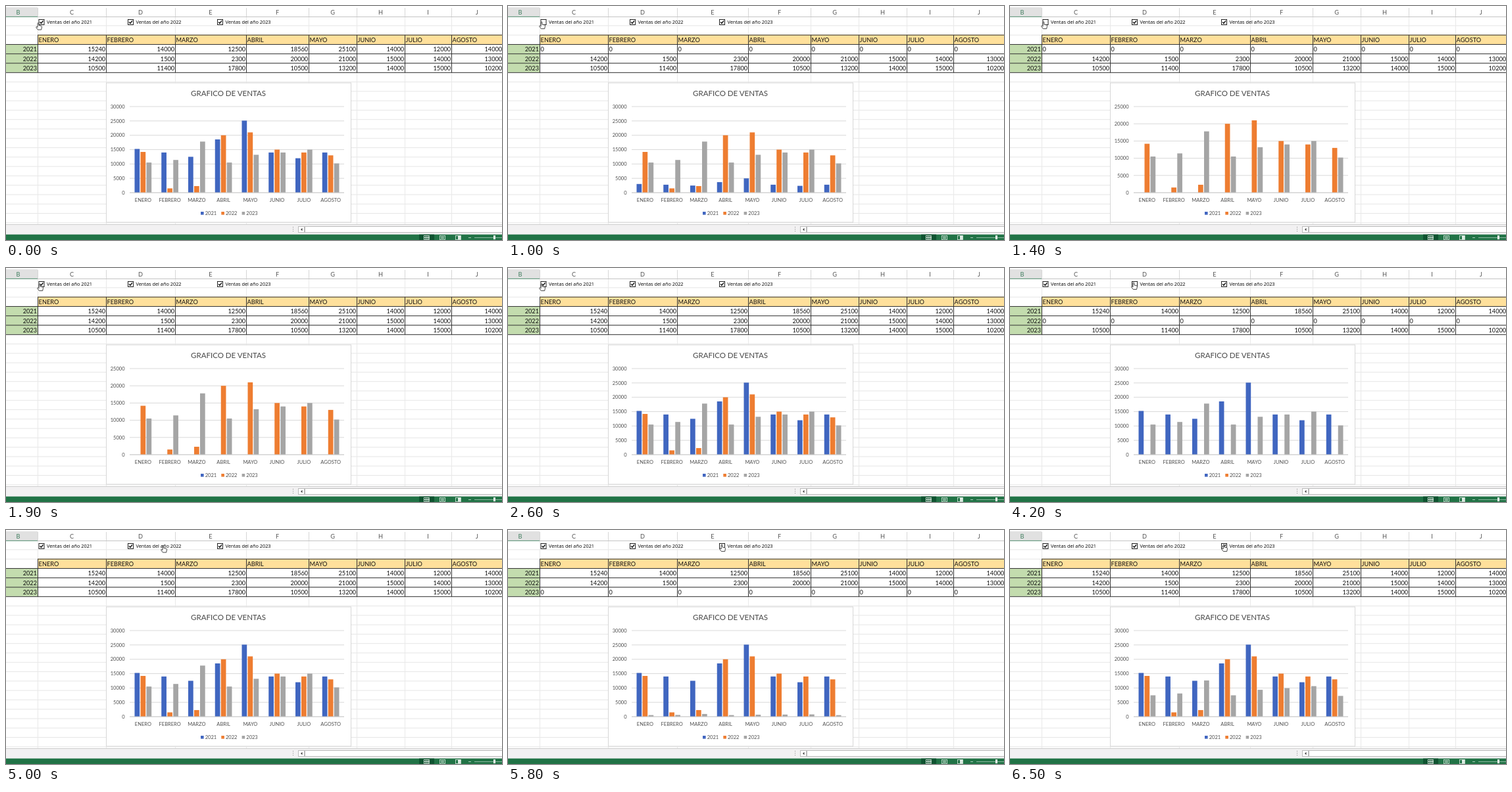
An HTML page that plays this animation: 754x356 px, repeating every 6.6 s.

```html
<!DOCTYPE html>
<html lang="es">
<head>
<meta charset="utf-8">
<title>Grafico de ventas</title>
<style>
  html, body { margin: 0; width: 100%; height: 100%; overflow: hidden; background: #fff; }
  svg { display: block; width: 754px; height: 356px; }
  text { font-family: Lato, Carlito, sans-serif; font-size: 9.2px; fill: #111; white-space: pre; }
  .head { fill: #555; }
  .small { font-size: 7.5px; fill: #505050; }
  .title { font-size: 11.5px; fill: #484848; }
  .check { font-family: "Open Sans", sans-serif; font-size: 7.35px; fill: #000; }
  .line { shape-rendering: crispEdges; }
</style>
</head>
<body>
<svg id="stage" viewBox="0 0 754 356"></svg>
<script>
const stage = document.getElementById("stage");
const LOOP = 6600, STEP = 100, EASE_MS = 480;

const months = ["ENERO", "FEBRERO", "MARZO", "ABRIL", "MAYO", "JUNIO", "JULIO", "AGOSTO"];
const cols = [48, 152, 257, 365, 460, 533, 606, 677, 755];
const series = [
  { year: 2021, color: "#4066c0", box: 54, off: 800, on: 1900,
    sales: [15240, 14000, 12500, 18560, 25100, 14000, 12000, 14000] },
  { year: 2022, color: "#ee7d31", box: 189.5, off: 3400, on: 4300,
    sales: [14200, 1500, 2300, 20000, 21000, 15000, 14000, 13000] },
  { year: 2023, color: "#a5a5a5", box: 325.5, off: 5500, on: 6338,
    sales: [10500, 11400, 17800, 10500, 13200, 14000, 15000, 10200] }
];
// Pointer stops: time, x, y of the fingertip
const path = [
  [0, 49, 25.5], [300, 51, 24], [2700, 51, 24], [3200, 187, 21.5],
  [4500, 188, 22], [5000, 239, 23.5], [5400, 325, 22], [LOOP, 325, 22]
];

function add(tag, attrs, parent = stage) {
  const el = document.createElementNS("http://www.w3.org/2000/svg", tag);
  for (const k in attrs) el.setAttribute(k, attrs[k]);
  parent.appendChild(el);
  return el;
}
const rect = (x, y, width, height, fill, more) =>
  add("rect", { x, y, width, height, fill, ...more });
const line = (x, y, w, h, fill) => rect(x, y, w, h, fill, { class: "line" });
function text(str, x, y, cls = "", anchor = "start") {
  const el = add("text", { x, y, class: cls, "text-anchor": anchor });
  el.textContent = str;
  return el;
}
const rowY = k => 43.7 + 14.28 * k;

// Sheet grid and column headings
function drawSheet() {
  rect(0, 0, 754, 356, "#fff");
  for (let k = -1; k <= 20; k++) rect(0, rowY(k), 754, 1, "#e6e6e6");
  for (const x of cols) line(x, 17, 1, 315, "#e9e9e9");
  line(0, 2, 48, 14, "#e1e1e1");
  rect(0, 16, 754, 1, "#c4c4c4");
  rect(0, 15.8, 48, 1, "#5a9678");
  for (const x of cols) line(x, 3, 1, 13, "#d6d6d6");
  text("B", 18.5, 13, "head", "middle").style.fill = "#3f7d5e";
  months.forEach((_, i) => {
    const mid = i === 7 ? 716 : (cols[i] + cols[i + 1]) / 2;
    text("CDEFGHIJ"[i], mid, 13, "head", "middle");
  });
}

function drawTable() {
  rect(48, rowY(0), 706, 14.28, "#ffe09b");
  rect(0, rowY(1), 48, 42.84, "#c3dcae");
  rect(48, rowY(0), 706, 1, "#333");
  for (let k = 1; k <= 4; k++) rect(0, rowY(k), 754, 1, "#333");
  for (const x of cols) line(x, 44, 1, 57, "#333");
  months.forEach((m, i) => text(m, cols[i] + 1.6, 55));
  series.forEach((s, r) => {
    const y = rowY(r + 1) + 11.3;
    text(s.year, 47, y, "", "end");
    s.cells = s.sales.map((v, i) => text(v, cols[i + 1] - 0.8, y, "", "end"));
  });
}

function drawChecks() {
  for (const s of series) {
    rect(s.box - 4, 20.5, 8, 8, "#fff", { stroke: "#222", "stroke-width": 1 });
    s.tick = add("path", {
      d: `M${s.box - 2.4} 24.4l1.8 2l3.1-4`, fill: "none", stroke: "#111", "stroke-width": 1.5
    });
    text("Ventas del año " + s.year, s.box + 8, 27.2, "check");
  }
}

const BASE = 284, PLOT_H = 131, SLOT = 40.75, BAR = 7.7, PITCH = 9;
const axis = [];

function drawChart() {
  rect(152.5, 117, 372, 212, "#fff", { stroke: "#d6d6d6" });
  text("GRAFICO DE VENTAS", 338, 137.3, "title", "middle");
  for (let k = 0; k <= 6; k++) {
    axis.push({
      rule: rect(188, BASE, 326, 1, "#d9d9d9"),
      label: text(k * 5000, 180.5, 0, "small", "end")
    });
  }
  series.forEach((s, r) => {
    s.bars = months.map((_, i) =>
      rect(195.5 + SLOT * i + r * PITCH, BASE, BAR, 0, s.color));
    const x = 296 + r * 31.3;
    rect(x, 313, 4.6, 4.6, s.color);
    text(s.year, x + 6.7, 318, "small");
  });
  rect(188, BASE - 0.5, 326, 1, "#cfcfcf");
  months.forEach((m, i) => text(m, 188 + SLOT * (i + 0.5), 298, "small", "middle"));
}

// Scroll bar and status bar
function drawFooter() {
  rect(0, 332, 754, 16, "#f2f1f2");
  line(0, 332, 754, 1, "#cdcdcd");
  for (let k = 0; k < 3; k++) line(436, 336 + k * 3, 1, 1, "#888");
  rect(444.5, 335.5, 9, 9, "#fff", { stroke: "#bbb" });
  add("path", { d: "M450.5 337.8v4.4l-2.6-2.2z", fill: "#444" });
  rect(454.5, 335.5, 310, 9, "#fff", { stroke: "#bbb" });
  rect(0, 347.6, 754, 9, "#217346");
  rect(628, 347.6, 23, 9, "#0f5330");
  for (const x of [635, 659, 683]) {
    rect(x + 0.5, 349.5, 8, 6, "none", { stroke: "#dcebe2", "stroke-width": 0.8 });
  }
  line(635, 352, 9, 1, "#dcebe2");
  line(638, 349, 1, 6, "#dcebe2");
  line(641, 349, 1, 6, "#dcebe2");
  line(661, 351, 5, 1, "#dcebe2");
  line(661, 353, 5, 1, "#dcebe2");
  line(687, 349, 4, 6, "#dcebe2");
  line(703, 352, 4, 1, "#a9cbb8");
  line(712, 352, 42, 1, "#8db9a1");
  line(741, 349, 3, 6, "#f4f4f4");
}

drawSheet();
drawTable();
drawChecks();
drawChart();
drawFooter();
const hand = add("path", {
  d: "M-.9 .6Q0-.6 .9 .6V4L4.6 4.9Q5.6 5.2 5.5 6.3L4.7 10.6H-.6L-3.2 7.2Q-3.4 5.8-2.2 6L-.9 7Z",
  fill: "#fff", stroke: "#333", "stroke-width": 0.9, "stroke-linejoin": "round"
});

const easeOut = p => 1 - (1 - Math.min(1, Math.max(0, p))) ** 3;

// Part of the full value a series shows at time t
function share(s, t) {
  if (t >= s.on) return easeOut((t - s.on) / EASE_MS);
  return 1 - easeOut((t - s.off) / EASE_MS);
}

function pointerAt(t) {
  const i = path.findIndex(p => p[0] > t);
  const [t0, x0, y0] = path[i - 1], [t1, x1, y1] = path[i];
  const p = (t - t0) / (t1 - t0), e = p * p * (3 - 2 * p);
  return [x0 + (x1 - x0) * e, y0 + (y1 - y0) * e];
}

function render(t) {
  const top = share(series[0], t) > 0 ? 30000 : 25000;
  const scale = PLOT_H / top;

  axis.forEach(({ rule, label }, k) => {
    const y = BASE - k * 5000 * scale;
    const shown = k * 5000 <= top ? "visible" : "hidden";
    rule.setAttribute("y", y - 0.5);
    label.setAttribute("y", y + 2.7);
    rule.setAttribute("visibility", shown);
    label.setAttribute("visibility", shown);
  });

  for (const s of series) {
    const checked = t < s.off || t >= s.on;
    const part = share(s, t);
    s.tick.setAttribute("visibility", checked ? "visible" : "hidden");
    s.sales.forEach((v, i) => {
      const h = v * part * scale;
      s.bars[i].setAttribute("y", BASE - h);
      s.bars[i].setAttribute("height", h);
      const cell = s.cells[i];
      cell.textContent = checked ? v : 0;
      cell.setAttribute("x", checked ? cols[i + 1] - 0.8 : cols[i] + 1.6);
      cell.setAttribute("text-anchor", checked ? "end" : "start");
    });
  }
  hand.setAttribute("transform", `translate(${pointerAt(t)})`);
}

const start = performance.now();
let last = -1;
function tick() {
  const t = Math.floor(((performance.now() - start) % LOOP) / STEP) * STEP;
  if (t !== last) render(last = t);
  requestAnimationFrame(tick);
}
tick();
</script>
</body>
</html>
```
